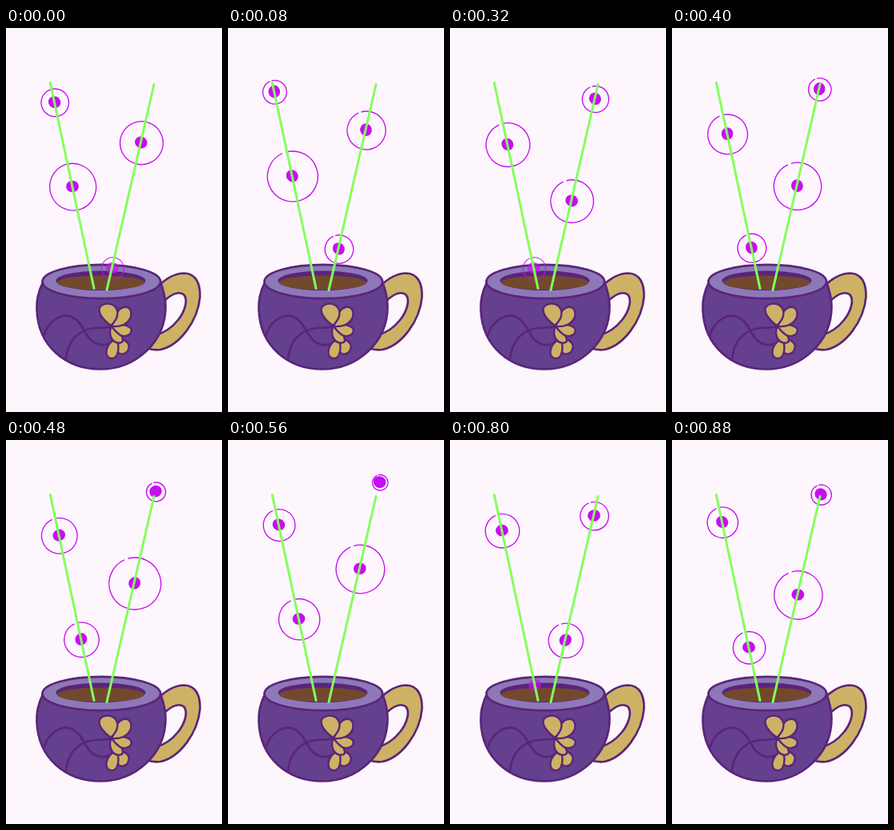
An HTML page that plays this animation: 270 px wide and 480 px high, repeating every 0.96 s.

```html
<!DOCTYPE html>
<html lang="en">
<head>
<meta charset="utf-8">
<title>Steaming cup</title>
<style>
  html, body { margin: 0; width: 100%; height: 100%; overflow: hidden; background: #fdf7fd; }
  svg { display: block; width: 100%; height: 100%; }
  .ink { stroke: #5b2479; stroke-width: 2.7; stroke-linejoin: round; stroke-linecap: round; }
  .gold { fill: #cdb265; }
  .ring { fill: none; stroke: #c70df2; stroke-width: 1.35; }
  .dot { fill: #c70df2; }
  .beam { stroke: #84ff5c; stroke-width: 3; stroke-linecap: round; }
</style>
</head>
<body>
<svg viewBox="0 0 270 480" xmlns="http://www.w3.org/2000/svg">
  <rect width="270" height="480" fill="#fdf7fd"/>
  <g class="ink">
    <path class="gold" d="M190 323C202 311 214 306.5 223 306.5C237 307 243 319 242.5 336C240 366 217 397 193 402C186 403 181 402 175 400Z"/>
    <path fill="#fdf7fd" d="M199 340C207 333 216 329 222 333C228 339 224 354 215 365C207 375 198 381 187 384L180 360Z"/>
    <path fill="#64408f" d="M46 318C40 330 38 342 38.5 352C40 398 75 426.5 118 426.5C162 426.5 199.5 393 199.5 348C199.5 338 197 328 193 317Z"/>
    <g fill="none">
      <path d="M47.5 383.5C53 367 68 356 82 361C98 368 98 388 112 394C118 397 124 397 130 394"/>
      <path d="M75 414C77 390 92 376 112 375C122 375 128 374 134 373"/>
    </g>
    <g class="gold" stroke-width="2.4">
      <path d="M138 389C144 387 153 391 153.7 398C153 406 147 409.5 141 406.5C138 402 137 395 138 389Z"/>
      <path d="M138 389C130 391 125 399 125.5 407C127 414 135 415 138.5 409C141 403 141 395 138 389Z"/>
      <path d="M131 374C139 375 146 384 146 391.5C143 396 135 393 132.5 389C129.5 384 129.5 379 131 374Z"/>
      <path d="M132 373C140 370 152 370 156.5 376C158 383 151 386.5 144 384.5C139 382 135 377 132 373Z"/>
      <path d="M132.5 373C135 364 138 351 147 349C155 347.5 157.5 354 156 361C153 370 143 374 132.5 373Z"/>
      <path d="M131 372C123 366 116 358 116.5 351C119 344 129 343 135 347C141 352 142 362 131 372Z"/>
    </g>
    <ellipse cx="119.3" cy="317" rx="73.8" ry="21.2" fill="#8d78b8"/>
  </g>
  <ellipse cx="118.5" cy="315.8" rx="56" ry="12.3" fill="#5b2479"/>
  <ellipse cx="118.5" cy="318.3" rx="54.5" ry="8.8" fill="#73492e"/>
  <g id="pulses"></g>
  <path class="beam" d="M55.3 68.5L110 325.5"/>
  <path class="beam" d="M185 70.5L126 327.5"/>
</svg>
<script>
const STEP = 80, SLOW = 8, QUICK = 4;

// Two pulses climb each beam: a slow round of 8 steps, then a quick one of 4.
// A pulse lives for two rounds; its height runs through [age, y, easing power].
const beams = [
  {
    x: y => 55.5 + (y - 68.5) * 0.2128,
    slow: [[0, 300], [4, 198], [16, 40]],
    quick: [[0, 306], [2, 182, 1.4], [4, 113], [6, 68, 2.1], [8, 46]],
    lead: 0.5
  },
  {
    x: y => 185.5 - (y - 70.5) * 0.2296,
    slow: [[0, 300], [8, 143, 0.9], [16, 41, 0.9]],
    quick: [[0, 306], [4, 120.5, 1.73], [8, 34, 1.73]],
    lead: 0
  }
];

const layer = document.getElementById('pulses');
const add = (tag, name) => {
  const el = document.createElementNS('http://www.w3.org/2000/svg', tag);
  el.setAttribute('class', name);
  return layer.appendChild(el);
};
const set = (el, attrs) => {
  for (const k in attrs) el.setAttribute(k, attrs[k]);
};
for (const b of beams) {
  b.parts = [0, 1].map(() => ({ ring: add('path', 'ring'), dot: add('ellipse', 'dot') }));
}

function heightAt(keys, age) {
  const i = keys.findIndex(k => k[0] > age);
  const [a0, y0] = keys[i - 1], [a1, y1, power = 1] = keys[i];
  return y0 + (y1 - y0) * ((age - a0) / (a1 - a0)) ** power;
}

// Rings swell towards mid-height and shrink again near the top.
const radiusAt = y => 33 - Math.abs(y - 175) * (y > 175 ? 0.152 : 0.19);

function ringPath(x, y, r, gap) {
  const at = deg => {
    const a = deg * Math.PI / 180;
    return (x + r * Math.cos(a)).toFixed(2) + ' ' + (y + r * Math.sin(a)).toFixed(2);
  };
  return `M${at(-110 + gap)}A${r} ${r} 0 0 1 ${at(70)}A${r} ${r} 0 0 1 ${at(-110 - gap)}`;
}

function draw(n) {
  const quick = n >= SLOW;
  const k = quick ? n - SLOW : n;
  const span = quick ? QUICK : SLOW;
  for (const b of beams) {
    const first = (k + b.lead * span) % span;
    b.parts.forEach((p, i) => {
      const y = heightAt(quick ? b.quick : b.slow, first + i * span);
      const x = b.x(y);
      const fresh = y > 295;
      set(p.ring, {
        d: ringPath(x + 0.6, y + 0.7, radiusAt(y), k ? 4 : 0),
        opacity: y > 304 ? 0 : fresh ? 0.75 : 1
      });
      set(p.dot, {
        cx: x, cy: y, rx: 7.9, ry: 7.3, opacity: fresh ? 0.7 : 1,
        transform: `rotate(${n * 50 + i * 30} ${x} ${y})`
      });
    });
  }
}

const start = performance.now();
let shown = -1;
function tick() {
  const n = Math.floor((performance.now() - start) / STEP) % (SLOW + QUICK);
  if (n !== shown) draw(shown = n);
  requestAnimationFrame(tick);
}
tick();
</script>
</body>
</html>
```
